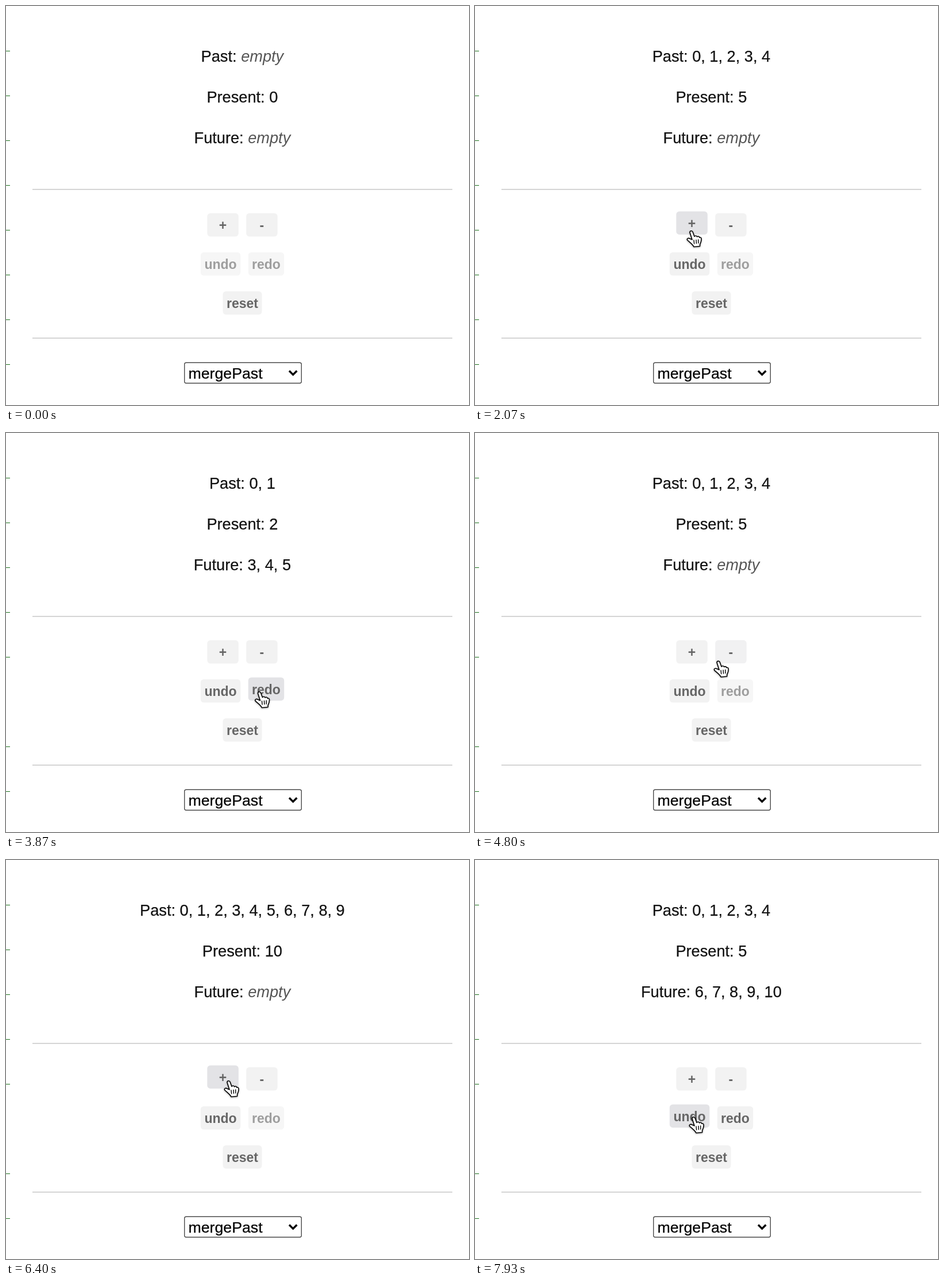
These frames come from a looping animation (806x695 px, 8 s). An HTML page:

```html
<!DOCTYPE html>
<html lang="en">
<head>
<meta charset="utf-8">
<title>Undo history</title>
<style>
  html, body { margin: 0; width: 100%; height: 100%; overflow: hidden; background: #fff; }
  svg { display: block; width: 100%; height: 100%; }
  text { font-family: "Liberation Sans", Arial, sans-serif; white-space: pre; }
  .state { font-size: 27.2px; fill: #121212; stroke: #121212; stroke-width: .25px; text-anchor: middle; }
  .empty { font-style: italic; fill: #555; stroke: none; }
  .label { font-size: 23px; font-weight: 700; fill: #666; text-anchor: middle; }
  .choice { font-size: 26.7px; stroke: #000; stroke-width: .25px; }
</style>
</head>
<body>
<svg viewBox="0 0 806 695" xmlns="http://www.w3.org/2000/svg">
  <g id="ticks" fill="#1c701c"></g>
  <text class="state" x="411.4" y="97"><tspan>Past: </tspan><tspan id="past"></tspan></text>
  <text class="state" x="411.4" y="168"><tspan>Present: </tspan><tspan id="present"></tspan></text>
  <text class="state" x="411.4" y="239"><tspan>Future: </tspan><tspan id="future"></tspan></text>
  <path d="M46 319.5H777M46 578.5H777" stroke="#c6c6c6" stroke-width="1.5"/>
  <g id="buttons"></g>
  <rect x="310.7" y="621.2" width="203.6" height="35.8" rx="3" fill="#fff" stroke="#4a4a4a" stroke-width="1.4"/>
  <text class="choice" x="317.5" y="649">mergePast</text>
  <path d="M493 635.5l6.7 6.7 6.7-6.7" fill="none" stroke="#000" stroke-width="3.4"/>
  <g id="cursor" style="filter: drop-shadow(0 1.5px 1.5px rgba(0,0,0,.35))">
    <path id="arrow" d="M0 0V22L5 17.5L8.5 25.5L12 24L8.5 16H15.5Z" fill="#000" stroke="#fff" stroke-width="1.5"/>
    <g id="hand" transform="translate(0 -2)" stroke="#000" stroke-width="1.6" stroke-linecap="round" stroke-linejoin="round">
      <path fill="#fff" d="M-3 2.5C-3-.8 1-1 2 1.5L5 9.5C6 7.6 9 7.8 9.6 10C11 8.6 13.4 9.2 13.7 11.2C15.5 10.4 17 11.6 17 13.5C17.3 18 16.3 19.5 14.6 23L14.5 26.5L4 27.5C2 23-3 20-7.3 15.8C-8.8 13-5.5 11.6-3.5 13L1 15Z"/>
      <path fill="none" stroke-width="1.4" d="M4 16l.6 6M8 15.5l.4 6M11.7 15l.1 6"/>
    </g>
  </g>
</svg>
<script>
const LOOP = 8000;
const ENTER = 70;
const CENTER = 411.5;
const GAP = 13.4;
const HEIGHT = 40.5;
const NS = "http://www.w3.org/2000/svg";
const byId = id => document.getElementById(id);
const clamp = v => Math.max(0, Math.min(1, v));
const mix = (a, b, u) => a + (b - a) * u;
const range = (from, to) => Array.from({ length: Math.max(0, to - from + 1) }, (_, i) => from + i);

function add(parent, tag, attrs, content = "") {
  const node = document.createElementNS(NS, tag);
  for (const key in attrs) node.setAttribute(key, attrs[key]);
  node.textContent = content;
  return parent.appendChild(node);
}

// Each visit is a run of evenly spaced clicks at one spot.
const visits = [
  { x: 377, y: 394, action: "add", first: 868, every: 264, count: 5 },
  { x: 366, y: 457, action: "undo", first: 2670, every: 265, count: 3 },
  { x: 447, y: 453, action: "redo", first: 4000, every: 215, count: 3 },
  { x: 388, y: 387, action: "add", first: 5130, every: 310, count: 5 },
  { x: 381, y: 450, action: "undo", first: 6970, every: 225, count: 5 }
];
const leaveTime = v => v.first + (v.count - 1) * v.every + 150;

function stateAt(t) {
  let now = 0, top = 0;
  for (const v of visits) {
    const clicks = Math.max(0, Math.min(v.count, Math.floor((t - v.first) / v.every) + 1));
    now += v.action === "undo" ? -clicks : clicks;
    if (v.action === "add" && clicks) top = now;
  }
  return { now, top };
}

// Moves arc: the vertical part settles sooner than the horizontal part.
function pointerAt(t) {
  let from = { x: 637, y: 690 }, leave = ENTER;
  for (const v of visits) {
    const arrive = v.first - 30;
    if (t < arrive) {
      const u = clamp((t - leave) / (arrive - leave));
      return { x: mix(from.x, v.x, u * u * (3 - 2 * u)), y: mix(from.y, v.y, 1 - (1 - u) ** 3) };
    }
    from = v;
    leave = leaveTime(v);
  }
  return from;
}

const rows = [
  [{ text: "+", w: 54.5 }, { text: "-", w: 54.5 }],
  [{ text: "undo", w: 69.5, enabled: s => s.now > 0 }, { text: "redo", w: 62.5, enabled: s => s.now < s.top }],
  [{ text: "reset", w: 68 }]
];
rows.forEach((row, i) => {
  let x = CENTER - (row.reduce((sum, b) => sum + b.w + GAP, -GAP)) / 2;
  for (const b of row) {
    Object.assign(b, { x, y: 361 + 68 * i });
    b.group = add(byId("buttons"), "g", {});
    b.rect = add(b.group, "rect", { x, y: b.y, width: b.w, height: HEIGHT, rx: 5.5 });
    add(b.group, "text", { class: "label", x: x + b.w / 2, y: b.y + 29.3 }, b.text);
    x += b.w + GAP;
  }
});
const buttons = rows.flat();
const contains = (b, p) => p.x >= b.x && p.x <= b.x + b.w && p.y >= b.y && p.y <= b.y + HEIGHT;

const hiddenFrom = { 156: 7530, 468: 2700 };
const ticks = range(1, 8).map(i => {
  const y = 78 * i;
  return { until: hiddenFrom[y] ?? LOOP, node: add(byId("ticks"), "rect", { x: 0, y, width: 7, height: 1 }) };
});

// Share of the last `span` ms in which the test held, used as a CSS-like transition.
function recentShare(test, t, span) {
  const samples = range(0, 9).filter(i => test(t - span * i / 10));
  return samples.length / 10;
}

function showList(id, list) {
  byId(id).textContent = list.join(", ") || "empty";
  byId(id).setAttribute("class", list.length ? "" : "empty");
}

function drawButton(b, t) {
  const hover = recentShare(time => contains(b, pointerAt(time)), t, 130) ** 2;
  const enabled = b.enabled ? recentShare(time => b.enabled(stateAt(time)), t, 70) : 1;
  const shade = mix(242, 227, hover);
  b.rect.setAttribute("fill", `rgb(${shade},${shade},${mix(242, 230, hover)})`);
  b.group.setAttribute("transform", `translate(0 ${-3.3 * hover})`);
  b.group.setAttribute("opacity", mix(0.63, 1, enabled));
}

function draw(t) {
  const { now, top } = stateAt(t);
  showList("past", range(0, now - 1));
  byId("present").textContent = now;
  showList("future", range(now + 1, top));
  for (const b of buttons) drawButton(b, t);

  const tip = pointerAt(t);
  const over = buttons.some(b => contains(b, tip));
  byId("cursor").setAttribute("transform", `translate(${tip.x} ${tip.y})`);
  byId("cursor").setAttribute("visibility", t < ENTER ? "hidden" : "visible");
  byId("hand").setAttribute("display", over ? "inline" : "none");
  byId("arrow").setAttribute("display", over ? "none" : "inline");
  for (const tick of ticks) tick.node.setAttribute("display", t < tick.until ? "inline" : "none");
}

const start = performance.now();
function loop() {
  draw((performance.now() - start) % LOOP);
  requestAnimationFrame(loop);
}
loop();
</script>
</body>
</html>
```
